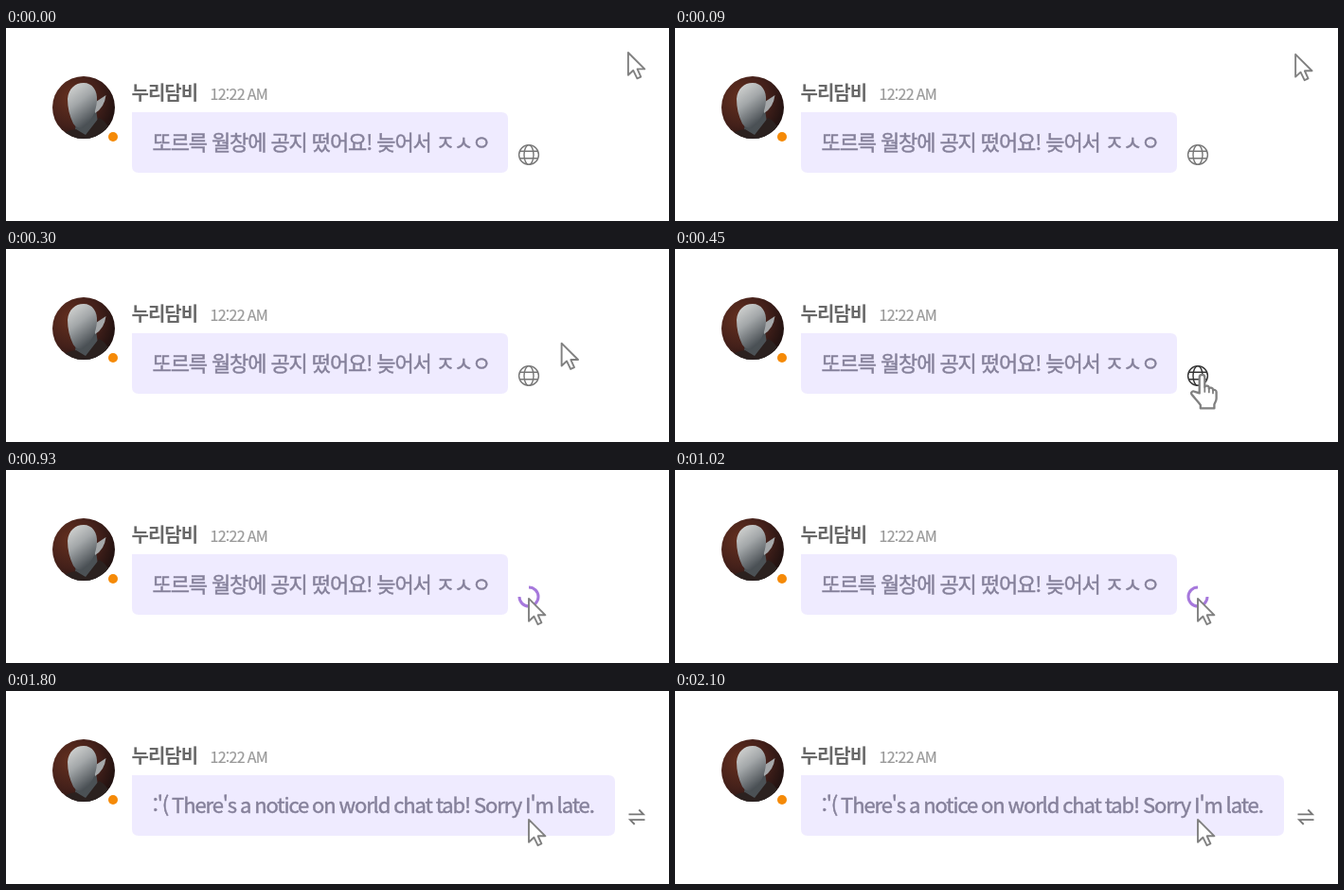
An HTML page that plays this animation: 700 px wide and 204 px high, repeating every 2.13 s.

```html
<!DOCTYPE html>
<html lang="ko">
<head>
<meta charset="utf-8">
<title>Chat translation</title>
<style>
  html, body { margin: 0; width: 100%; height: 100%; overflow: hidden; background: #fff; }
  svg { display: block; width: 100%; height: 100%; }
  text {
    font-family: "Noto Sans CJK KR", "Noto Sans CJK JP", "Noto Sans CJK SC", "Noto Sans", sans-serif;
    font-feature-settings: "calt" 0;
  }
  .name { font-size: 20px; font-weight: 700; letter-spacing: -1px; fill: #686868; }
  .time { font-size: 16px; letter-spacing: -.7px; word-spacing: -1px; fill: #999; stroke: #999; stroke-width: .2; }
  .msg { font-size: 22px; letter-spacing: -1.1px; fill: #85809a; stroke: #85809a; stroke-width: .45; }
  .en { word-spacing: -1.15px; }
  .line { fill: none; stroke: #777; stroke-width: 1.4; }
  .cursor { fill: #fff; stroke: #808080; stroke-width: 1.9; stroke-linejoin: round; stroke-linecap: round; }
</style>
</head>
<body>
<svg viewBox="0 0 700 204">
  <defs>
    <radialGradient id="room" cx=".3" cy=".35" r=".75">
      <stop offset="0" stop-color="#65301f"/>
      <stop offset=".6" stop-color="#43201a"/>
      <stop offset="1" stop-color="#1f1110"/>
    </radialGradient>
    <linearGradient id="skin" x1=".1" y1="0" x2=".6" y2="1">
      <stop offset="0" stop-color="#d8d9d7"/>
      <stop offset=".45" stop-color="#a3a7a9"/>
      <stop offset="1" stop-color="#42484d"/>
    </linearGradient>
    <clipPath id="round"><circle cx="82" cy="84" r="33"/></clipPath>
  </defs>

  <g clip-path="url(#round)">
    <rect x="49" y="51" width="66" height="66" fill="url(#room)"/>
    <path d="M74 96L95 86L100 120H72Z" fill="#4b5155"/>
    <path d="M54 118Q62 108 74 107L84 113L98 95Q108 99 114 118Z" fill="#2b211f"/>
    <path d="M92 80L105.5 71Q104 84 94 90Z" fill="#a5a8aa"/>
    <path d="M82 58C91 58 97 66 96 77C95 89 91 97 82 105Q75 107 71 101C67 93 65 84 65 75C66 64 73 58 82 58Z" fill="url(#skin)"/>
  </g>
  <circle cx="113" cy="115" r="5" fill="#f58a07"/>

  <text class="name" x="132.5" y="76">누리담비</text>
  <text class="time" x="215.5" y="76">12:22 AM</text>

  <path id="bubble" fill="#efebff"/>
  <text id="ko" class="msg" x="154.5" y="129">또르륵 월창에 공지 떴어요! 늦어서 ㅈㅅㅇ</text>
  <text id="en" class="msg en" x="154.8" y="129">:'( There's a notice on world chat tab! Sorry I'm late.</text>

  <g id="globe" class="line">
    <circle cx="552" cy="134" r="10.4"/>
    <ellipse cx="552" cy="134" rx="5" ry="10.4"/>
    <path d="M542.3 130.3H561.7M542.3 137.7H561.7"/>
  </g>
  <path id="spin" d="M10 0A10 10 0 1 1 0 -10" fill="none" stroke="#a678dc" stroke-width="3"/>
  <path id="swap" class="line" style="stroke-width:1.8" d="M657.5 130.3H673L668.3 125.5M674.5 136.2H659L663.7 141"/>

  <path id="arrow" class="cursor" d="M0 0V23.8L5.4 18.8L9.5 27.3L13.4 25.6L9.7 17.4H17.4Z"/>
  <g id="hand" class="cursor" style="stroke-width:2.3">
    <path d="M1.7 16.5V-.2a2.8 2.8 0 0 1 5.6 0V10c.6-1.8 4.3-1.6 4.5 .8v1c.6-1.6 4-1.3 4.2 .9v1c.7-1.3 3.6-.8 3.6 1.5V22c0 3-1.6 4.4-2.2 6.5V32.5H2.8V29C.5 25.5-3 22-6.4 17.8c-1.5-2 .9-4.3 3.2-2.8Z"/>
    <path d="M7.3 10V15M11.8 11.5V15.5M16 13.5V16.5" fill="none" style="stroke-width:1.8"/>
  </g>
</svg>
<script>
  const LOOP = 2130, STEP = 30;
  const MOVE = [60, 450], HOVER = 420, LOAD = 930, DONE = 1110;
  const FROM = [656.9, 26], TO = [552, 135.9];
  const $ = id => document.getElementById(id);
  const show = (id, on) => $(id).setAttribute("visibility", on ? "visible" : "hidden");
  const place = (id, x, y, turn = 0) =>
    $(id).setAttribute("transform", `translate(${x} ${y}) rotate(${turn})`);

  const ease = p => p * p * (3 - 2 * p);
  const progress = (t, [a, b]) => Math.min(1, Math.max(0, (t - a) / (b - a)));

  // Bubble with a square top-left corner
  const bubble = right =>
    `M133 89H${right - 7}q7 0 7 7V146q0 7 -7 7H140q-7 0 -7 -7Z`;

  function draw(ms) {
    const t = Math.floor((ms % LOOP) / STEP) * STEP;
    const k = ease(progress(t, MOVE));
    const [x, y] = FROM.map((v, i) => v + (TO[i] - v) * k);
    const hover = t >= HOVER && t < LOAD;
    const done = t >= DONE;

    $("bubble").setAttribute("d", bubble(done ? 643 : 530));
    show("ko", !done);
    show("en", done);

    show("globe", t < LOAD);
    $("globe").style.stroke = hover ? "#333" : "#777";
    show("spin", t >= LOAD && !done);
    place("spin", 552, 134, t - 1020);
    show("swap", done);

    show("arrow", !hover);
    show("hand", hover);
    place("arrow", x, y);
    place("hand", x, y);
  }

  const start = performance.now();
  function tick() {
    draw(performance.now() - start);
    requestAnimationFrame(tick);
  }
  draw(0);
  requestAnimationFrame(tick);
</script>
</body>
</html>
```
